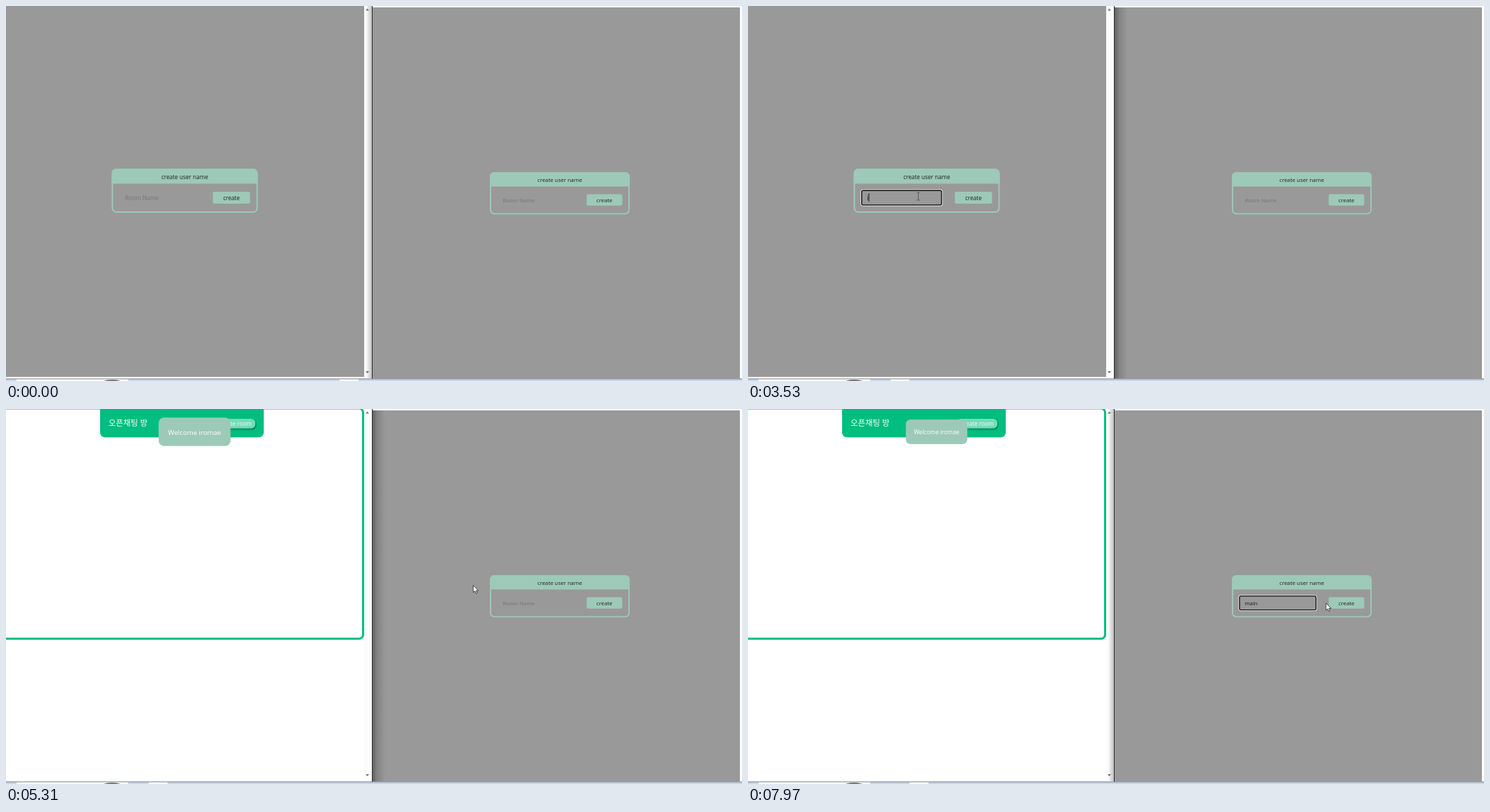
Write an HTML page that moves like this. It is 1048 px wide and 535 px high and loops after 8000 ms.

```html
<!DOCTYPE html>
<html lang="en">
<head>
<meta charset="utf-8">
<title>Chat room sign-in</title>
<style>
  html, body { margin: 0; width: 100%; height: 100%; overflow: hidden; background: #fff; }
  svg { display: block; width: 1048px; height: 535px; font-family: "Open Sans", "Noto Sans CJK KR", sans-serif; }
  text { white-space: pre; }
  .mid { text-anchor: middle; }
</style>
</head>
<body>
<svg viewBox="0 0 1048 535">
  <defs>
    <linearGradient id="castRight">
      <stop offset="0" stop-color="#000" stop-opacity=".36"/>
      <stop offset=".35" stop-color="#000" stop-opacity=".15"/>
      <stop offset="1" stop-color="#000" stop-opacity="0"/>
    </linearGradient>
    <linearGradient id="castLeft">
      <stop offset="0" stop-color="#000" stop-opacity="0"/>
      <stop offset="1" stop-color="#000" stop-opacity=".24"/>
    </linearGradient>
    <filter id="soft" x="-20%" y="-50%" width="140%" height="200%">
      <feDropShadow dx="1" dy="1.5" stdDeviation="1.2" flood-color="#000" flood-opacity=".4"/>
    </filter>
    <clipPath id="leftPane"><rect width="510" height="529.5"/></clipPath>
  </defs>

  <rect width="1048" height="535" fill="#fff"/>
  <rect x="510" width="11" height="530" fill="#fcfcfc"/>
  <path d="M512 6.5h5l-2.5-3zM512 521h5l-2.5 3z" fill="#777"/>

  <g clip-path="url(#leftPane)">
    <g id="lobby">
      <rect x="-20" y="-1" width="528.5" height="328.7" rx="6" fill="#fff" stroke="#00be7f" stroke-width="3"/>
      <rect x="134" y="-10" width="233" height="50.5" rx="7" fill="#00be7f"/>
      <text x="146" y="24" font-size="11.4" font-weight="500" fill="#fff">오픈채팅 방</text>
      <rect x="297" y="14" width="58" height="13.5" rx="6" fill="#72dcb8" filter="url(#soft)"/>
      <text x="350" y="24.3" font-size="8.3" text-anchor="end" fill="#f2fffa">create room</text>
    </g>
    <rect id="veil" width="510" height="529.5" fill="#999"/>
  </g>
  <rect x="522" y="2" width="523" height="529.5" fill="#999"/>

  <g id="forms"></g>

  <g id="toast">
    <rect x="-43.8" y="-17.4" width="87.6" height="34.8" rx="6.5" fill="#9dc9b8"/>
    <text class="mid" y="3.6" font-size="8.25" fill="#fff">Welcome iromae</text>
  </g>

  <rect id="shadeRight" x="522" y="2" width="18" height="529.5" fill="url(#castRight)"/>
  <rect id="shadeLeft" x="513" width="8" height="531" fill="url(#castLeft)"/>
  <rect x="521" width="1" height="532" fill="#2b2b2b"/>

  <rect y="531.5" width="1048" height="1.2" fill="#69727f"/>
  <rect y="532.7" width="1048" height="2.3" fill="#c6d5e8"/>
  <rect x="15" y="532.7" width="159" height="2.3" fill="#fff"/>
  <ellipse cx="151" cy="537" rx="14" ry="4" fill="#777"/>
  <rect id="task" y="532.7" width="27" height="2.3" fill="#fff"/>

  <path id="arrow" d="M0 0v10.2l2.4-2.2 1.6 3.7 1.7-.8-1.6-3.5h3.2z" fill="#fff" stroke="#222" stroke-width=".8"/>
  <path id="beam" d="M-2.5-5.5h2l.5.6.5-.6h2M0-5v10M-2.5 5.5h2l.5-.6.5.6h2" fill="none" stroke="#555" stroke-width=".9"/>
</svg>
<script>
const LOOP = 8000;
const $ = id => document.getElementById(id);
const show = (el, on) => el.style.display = on ? '' : 'none';
const latest = (steps, t) => steps.filter(s => s[0] <= t).pop();

function tween(keys, t) {
  const i = keys.findIndex(k => k[0] > t);
  if (i < 0) return keys[keys.length - 1].slice(1);
  if (i === 0) return keys[0].slice(1);
  const a = keys[i - 1], b = keys[i];
  const p = b.ease((t - a[0]) / (b[0] - a[0]));
  return a.slice(1).map((v, n) => v + (b[n + 1] - v) * p);
}
const linear = p => p;
const easeOut = p => 1 - (1 - p) ** 2;
const easeInOut = p => p * p * (3 - 2 * p);
const key = (ease, ...values) => Object.assign(values, { ease });

// Dialog with its own field; state is [time, text, focused, caret]
function makeForm(x, y, scale, steps) {
  const g = document.createElementNS('http://www.w3.org/2000/svg', 'g');
  g.setAttribute('transform', `translate(${x} ${y}) scale(${scale})`);
  g.innerHTML = `
    <rect x="1" y="1" width="206" height="61" rx="5.5" fill="none" stroke="#9dc9b8" stroke-width="2"/>
    <path d="M0 21.5V7a7 7 0 0 1 7-7H201a7 7 0 0 1 7 7V21.5z" fill="#9dc9b8"/>
    <text class="mid" x="104" y="14.8" font-size="8.2" fill="#222">create user name</text>
    <rect x="144" y="33" width="53" height="17" rx="2.5" fill="#9dc9b8"/>
    <text class="mid" x="170.5" y="44.8" font-size="8.2" fill="#222">create</text>
    <g class="ring" fill="none">
      <rect x="10.3" y="30.2" width="115.9" height="22.8" rx="2.5" stroke="#fff"/>
      <rect x="11.4" y="31.3" width="113.7" height="20.6" rx="1.8" stroke="#111" stroke-width="1.4"/>
    </g>
    <text class="field" x="19" y="44.9" font-size="8.25"></text>
    <rect class="caret" y="35.2" width="1" height="11.8" fill="#111"/>`;
  $('forms').append(g);
  const [ring, field, caret] = ['ring', 'field', 'caret'].map(c => g.querySelector('.' + c));
  return {
    g,
    draw(t) {
      const [, text, focused, blink] = latest(steps, t);
      show(ring, focused);
      show(caret, blink);
      field.textContent = text || 'Room Name';
      field.setAttribute('fill', text ? '#1a1a1a' : '#757575');
      field.setAttribute('text-decoration', text === 'ㅓ' ? 'underline' : 'none');
      caret.setAttribute('x', 19 + (text ? field.getComputedTextLength() : 0));
    }
  };
}

const typing = (word, times) => times.map(([t, n]) => [t, word.slice(0, n), 1, 1]);

const leftForm = makeForm(150.5, 232, 1, [
  [0, '', 0, 0], [850, '', 1, 1], [1340, '', 1, 0], [1670, 'ㅓ', 1, 0],
  [2000, '', 1, 1], [2560, '', 1, 0], [3050, '', 1, 1],
  ...typing('iromae', [[3530, 1], [3660, 2], [3780, 3], [3940, 5], [4060, 6]]),
  [4560, 'iromae', 1, 0], [4930, '', 0, 0]
]);
const rightForm = makeForm(689, 237, .957, [
  [0, '', 0, 0], [5935, '', 1, 1], [6430, '', 1, 0], [6920, '', 1, 1],
  ...typing('main', [[7000, 1], [7070, 2], [7150, 3], [7220, 4]]),
  [7750, 'main', 1, 0]
]);

const pointer = [
  key(linear, 40, 1003, 531), key(easeInOut, 800, 242.5, 271.5),
  key(linear, 4500, 242.5, 271.5), key(easeInOut, 4800, 322, 276.5),
  key(linear, 5000, 322, 276.5), key(easeInOut, 5280, 646, 251.5),
  key(linear, 5310, 665, 251.5), key(easeOut, 5800, 735, 271),
  key(linear, 7740, 735, 271), key(easeOut, 7970, 823, 277)
];
const toastScale = [
  key(linear, 4950, 0), key(easeOut, 5275, 1.25), key(linear, 5385, 1)
];
const activeTask = [[0, 475], [900, 203], [5960, 230]];

function draw(t) {
  const inLobby = t >= 5310;
  show($('veil'), !inLobby);
  show($('lobby'), inLobby);
  show(leftForm.g, !inLobby);
  if (!inLobby) leftForm.draw(t);
  rightForm.draw(t);

  const leftActive = t >= 810 && t < 5935;
  show($('shadeRight'), leftActive);
  show($('shadeLeft'), !leftActive);
  $('task').setAttribute('x', latest(activeTask, t)[1]);

  show($('toast'), t > 4950);
  $('toast').setAttribute('transform', `translate(268.5 32.5) scale(${tween(toastScale, t)[0]})`);

  const [x, y] = tween(pointer, t);
  const overField = (x > 161 && x < 277 && y > 262 && y < 285 && !inLobby)
    || (x > 699 && x < 810 && y > 266 && y < 287);
  show($('arrow'), t >= 40 && !overField);
  show($('beam'), overField);
  $(overField ? 'beam' : 'arrow').setAttribute('transform', `translate(${x} ${y})`);
}

const start = performance.now();
function frame() {
  draw((performance.now() - start) % LOOP);
  requestAnimationFrame(frame);
}
frame();
</script>
</body>
</html>
```
